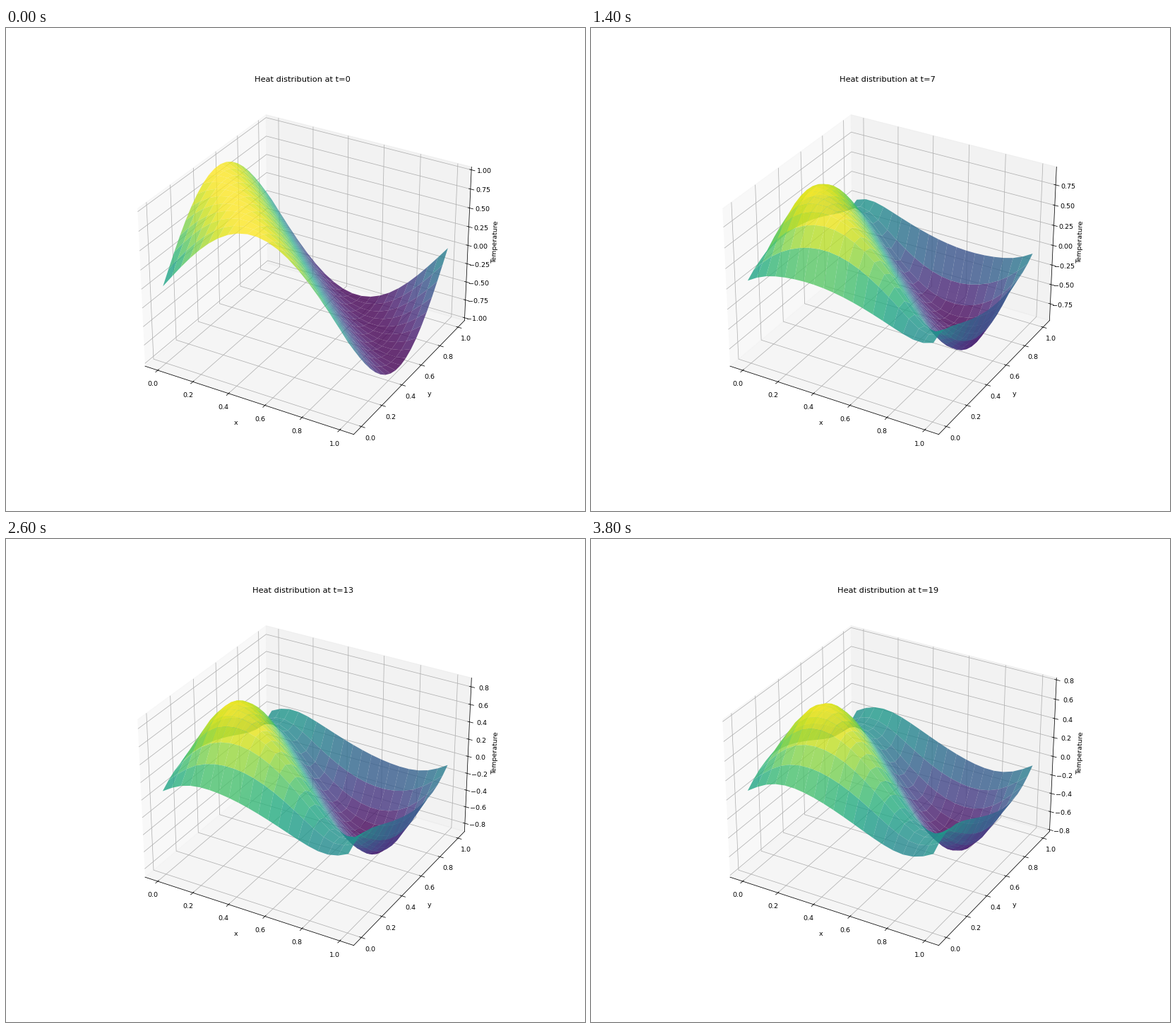
Write a matplotlib script that moves like this. It is 820 px wide and 683 px high and loops after 4000 ms.

```python
import numpy as np
import matplotlib.pyplot as plt
from matplotlib.animation import FuncAnimation

WIDTH, HEIGHT, DPI = 820, 683, 820 / 12
FRAMES, INTERVAL = 20, 200
N = 20
ALPHA, DT = 0.01, 0.05

axis = np.linspace(0, 1, N)
dx = axis[1] - axis[0]
X, Y = np.meshgrid(axis, axis)


def step(T):
    """One explicit heat step with wrap-around edges."""
    neighbours = sum(np.roll(T, s, a) for s in (1, -1) for a in (0, 1))
    return T + ALPHA * DT / dx**2 * (neighbours - 4 * T)


states = [np.sin(np.pi * (X + Y))]
for _ in range(FRAMES - 1):
    states.append(step(states[-1]))

# The small surplus keeps float rounding from dropping a pixel.
fig = plt.figure(figsize=((WIDTH + 0.01) / DPI, (HEIGHT + 0.01) / DPI), dpi=DPI)
ax = fig.add_subplot(projection="3d")


def draw(t):
    ax.clear()
    ax.plot_surface(X, Y, states[t], cmap="viridis", alpha=0.8)
    ax.set_title(f"Heat distribution at t={t}")
    ax.set_xlabel("x")
    ax.set_ylabel("y")
    ax.set_zlabel("Temperature")
    return []


anim = FuncAnimation(fig, draw, frames=FRAMES, interval=INTERVAL,
                     repeat=True, repeat_delay=0)
plt.show()
```
